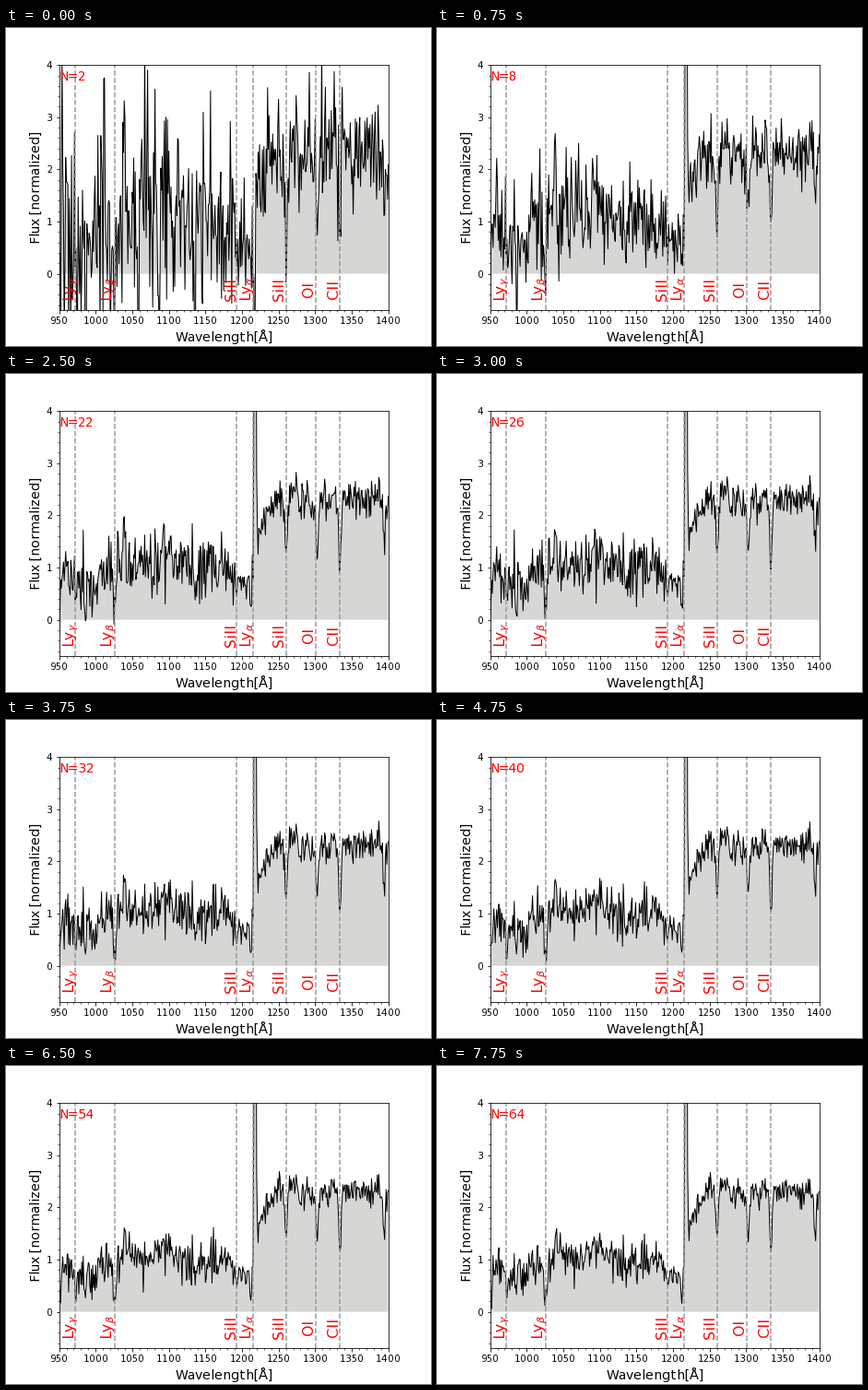
These frames come from a looping animation (461 px wide and 345 px high, 8 s). A matplotlib script:

```python
import numpy as np
import matplotlib.pyplot as plt
from matplotlib.animation import FuncAnimation

W, H = 461, 345
FRAMES, INTERVAL = 32, 250
STEP = 2  # spectra added to the stack per frame

plt.rcParams.update({"text.hinting_factor": 1, "text.kerning_factor": 6})

wave = np.arange(950, 1401, 1.0)
rng = np.random.default_rng(5)


def bump(center, width):
    return np.exp(-.5 * ((wave - center) / width) ** 2)


def decay(start, length):
    """Exponential falling from 1 at start, zero before it."""
    return np.where(wave >= start, np.exp(-np.abs(wave - start) / length), 0)


def make_base():
    """Mean spectrum: absorbed blue side, bright red side, absorption dips."""
    blue = np.where(wave < 1035, .82, .95) + .5 * decay(1039, 10)
    blue += .3 * bump(1096, 12) - .45 * np.clip((wave - 1188) / 25, 0, 1)
    red = 2.3 - .85 * decay(1220, 12) + .15 * bump(1250, 5) + .15 * bump(1268, 5)
    base = np.where(wave < 1218, blue, red)
    for center in (973, 1025.5, 1192):
        base -= .4 * bump(center, 2)
    for center in (1260, 1302.5, 1334, 1394):
        base -= .8 * bump(center, 1.6)
    return base + rng.normal(0, .07, wave.size)


def make_noise():
    """Noise of every single spectrum, strongest at the blue end."""
    sigma = np.where(wave < 1180, 1.45, .85) + 1.1 * decay(950, 15)
    return sigma * .82 * rng.standard_t(6, (FRAMES * STEP, wave.size))


base = make_base()
noise_sum = np.cumsum(make_noise(), axis=0)
peak = bump(1217.8, 1.0)
metals = sum(bump(c, 1.3) for c in (1260, 1302.5, 1334))


def stack(n):
    """Mean of the first n spectra."""
    flux = base + noise_sum[n - 1] / n
    return flux + 14 * (1 - 2.4 / n) * peak - 1.2 / np.sqrt(n) * metals


fig = plt.figure(figsize=(W / 72, H / 72), dpi=72, facecolor="white")
ax = fig.add_axes([57.6 / W, 38.7 / H, 357.1 / W, 266.1 / H])
ax.set_xlim(950, 1400)
ax.set_ylim(-.7, 4)
ax.set_yticks(range(5))
ax.minorticks_on()
ax.set_xlabel("Wavelength[Å]", fontsize=14)
ax.set_ylabel("Flux [normalized]", fontsize=14)

area, = ax.fill([950, 1400, 1400], [0, 0, 1], color="#d6d6d4", lw=0, zorder=1)
line, = ax.plot([], [], color="black", lw=1)

# Label, dashed line position, text baseline position
MARKS = [(r"Ly$_\gamma$", 972.5, 971.5), (r"Ly$_\beta$", 1025.5, 1022.5),
         ("SiII", 1192, 1191.5), (r"Ly$_\alpha$", 1215.7, 1212.5),
         ("SiII", 1260, 1257), ("OI", 1301, 1297.5), ("CII", 1334, 1331.5)]
for label, pos, text_pos in MARKS:
    ax.axvline(pos, color="0.6", ls="--", lw=1.5)
    ax.text(text_pos, -.3, label, color="red", fontsize=16, rotation=90,
            rotation_mode="anchor", ha="center", va="baseline")
counter = ax.text(950, 3.7, "", color="red", fontsize=14)


def update(i):
    n = STEP * (i + 1)
    flux = stack(n)
    line.set_data(wave, flux)
    x = np.concatenate([wave[:1], wave, wave[-1:]])
    y = np.concatenate([[0], flux, [0]])
    area.set_xy(np.column_stack([x, y]))
    counter.set_text(f"N={n}")
    return area, line, counter


anim = FuncAnimation(fig, update, frames=FRAMES, interval=INTERVAL,
                     repeat=True, repeat_delay=0)
plt.show()
```
